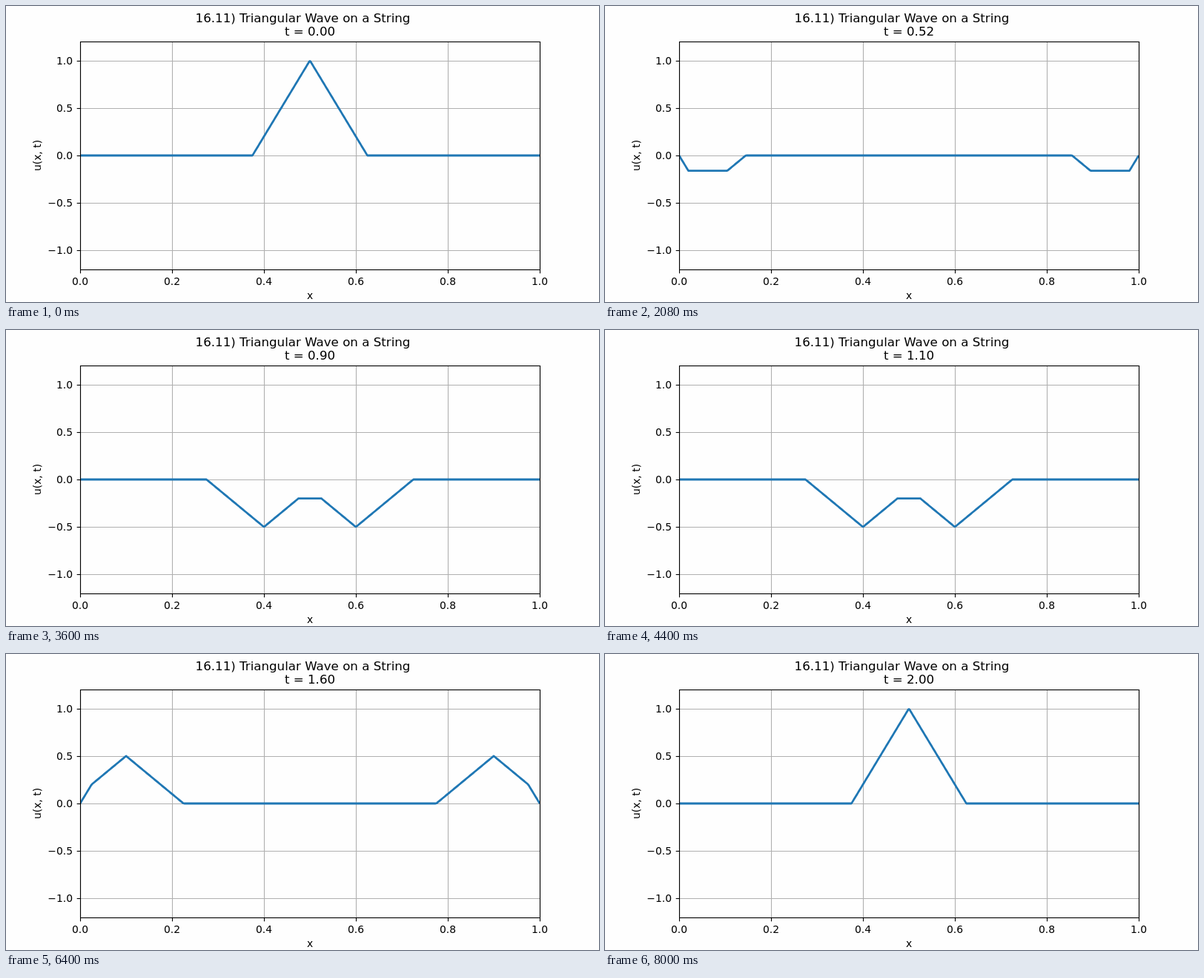
Animation of 800x400 px, one loop 8080 ms. Source, as an HTML page with a canvas:

```html
<!DOCTYPE html>
<html lang="en">
<head>
<meta charset="utf-8">
<title>Triangular wave</title>
<style>
html, body { margin: 0; width: 100%; height: 100%; overflow: hidden; background: #fefefe; }
canvas { display: block; }
</style>
</head>
<body>
<canvas id="stage" width="800" height="400"></canvas>
<script>
const ctx = document.getElementById('stage').getContext('2d');
const BOX = { x: 100, y: 48, w: 620, h: 308 };
const STEP_MS = 80, STEPS = 101, SAMPLES = 500;
const THIN = 0.8 * 100 / 72, THICK = 2 * 100 / 72;
const SMALL = 10 * 100 / 72, LARGE = 12 * 100 / 72;
const X_TICKS = [0, 0.2, 0.4, 0.6, 0.8, 1];
const Y_TICKS = [-1, -0.5, 0, 0.5, 1];

const toX = x => BOX.x + x * BOX.w;
const toY = u => BOX.y + BOX.h / 2 - u * BOX.h / 2.4;
const snap = v => Math.floor(v + 0.5) + 0.5;

// Initial pulse, extended as an odd function of period 2 (fixed ends).
function pulse(x) {
  x -= 2 * Math.floor((x + 1) / 2);
  return Math.sign(x) * Math.max(0, 1 - Math.abs(Math.abs(x) - 0.5) / 0.125);
}

const wave = (x, t) => (pulse(x - t) + pulse(x + t)) / 2;

function line(x1, y1, x2, y2, color) {
  ctx.strokeStyle = color;
  ctx.lineWidth = THIN;
  ctx.beginPath();
  ctx.moveTo(x1, y1);
  ctx.lineTo(x2, y2);
  ctx.stroke();
}

function text(str, x, y, size, align = 'center') {
  ctx.font = `${size}px "DejaVu Sans", sans-serif`;
  ctx.textAlign = align;
  ctx.fillStyle = '#000';
  ctx.fillText(str, x, y);
}

function drawGrid() {
  const { x, y, w, h } = BOX;
  for (const v of X_TICKS) line(snap(toX(v)), y, snap(toX(v)), y + h, '#b0b0b0');
  for (const v of Y_TICKS) line(x, snap(toY(v)), x + w, snap(toY(v)), '#b0b0b0');
}

function drawCurve(t) {
  ctx.save();
  ctx.beginPath();
  ctx.rect(BOX.x, BOX.y, BOX.w + 1, BOX.h + 1);
  ctx.clip();
  ctx.beginPath();
  for (let i = 0; i < SAMPLES; i++) {
    const x = i / (SAMPLES - 1);
    ctx.lineTo(toX(x), toY(wave(x, t)));
  }
  ctx.strokeStyle = '#1f77b4';
  ctx.lineWidth = THICK;
  ctx.lineJoin = 'round';
  ctx.stroke();
  ctx.restore();
}

function drawAxes() {
  const left = BOX.x + 0.5, bottom = BOX.y + BOX.h + 0.5, tick = 4.86;
  for (const v of X_TICKS) {
    const x = snap(toX(v));
    line(x, bottom, x, bottom + tick, '#000');
    text(v.toFixed(1), toX(v), 377, SMALL);
  }
  for (const v of Y_TICKS) {
    const y = snap(toY(v));
    line(left, y, left - tick, y, '#000');
    text(v.toFixed(1).replace('-', '\u2212'), 90, Math.round(toY(v) + 5.1), SMALL, 'right');
  }
  ctx.lineWidth = THIN;
  ctx.lineJoin = 'miter';
  ctx.strokeRect(left, BOX.y + 0.5, BOX.w, BOX.h);
}

function drawLabels(t) {
  text('16.11) Triangular Wave on a String', 400.5, 22, LARGE);
  text('t = ' + t.toFixed(2), 410, 40, LARGE);
  text('x', 410, 396, SMALL);
  ctx.save();
  ctx.translate(47, 202);
  ctx.rotate(-Math.PI / 2);
  text('u(x, t)', 0, 0, SMALL);
  ctx.restore();
}

function draw(ms) {
  const t = Math.floor(ms / STEP_MS) % STEPS * 0.02;
  ctx.fillStyle = '#fefefe';
  ctx.fillRect(0, 0, 800, 400);
  drawGrid();
  drawCurve(t);
  drawAxes();
  drawLabels(t);
}

const start = performance.now();
function loop() {
  draw(performance.now() - start);
  requestAnimationFrame(loop);
}
loop();
</script>
</body>
</html>
```
